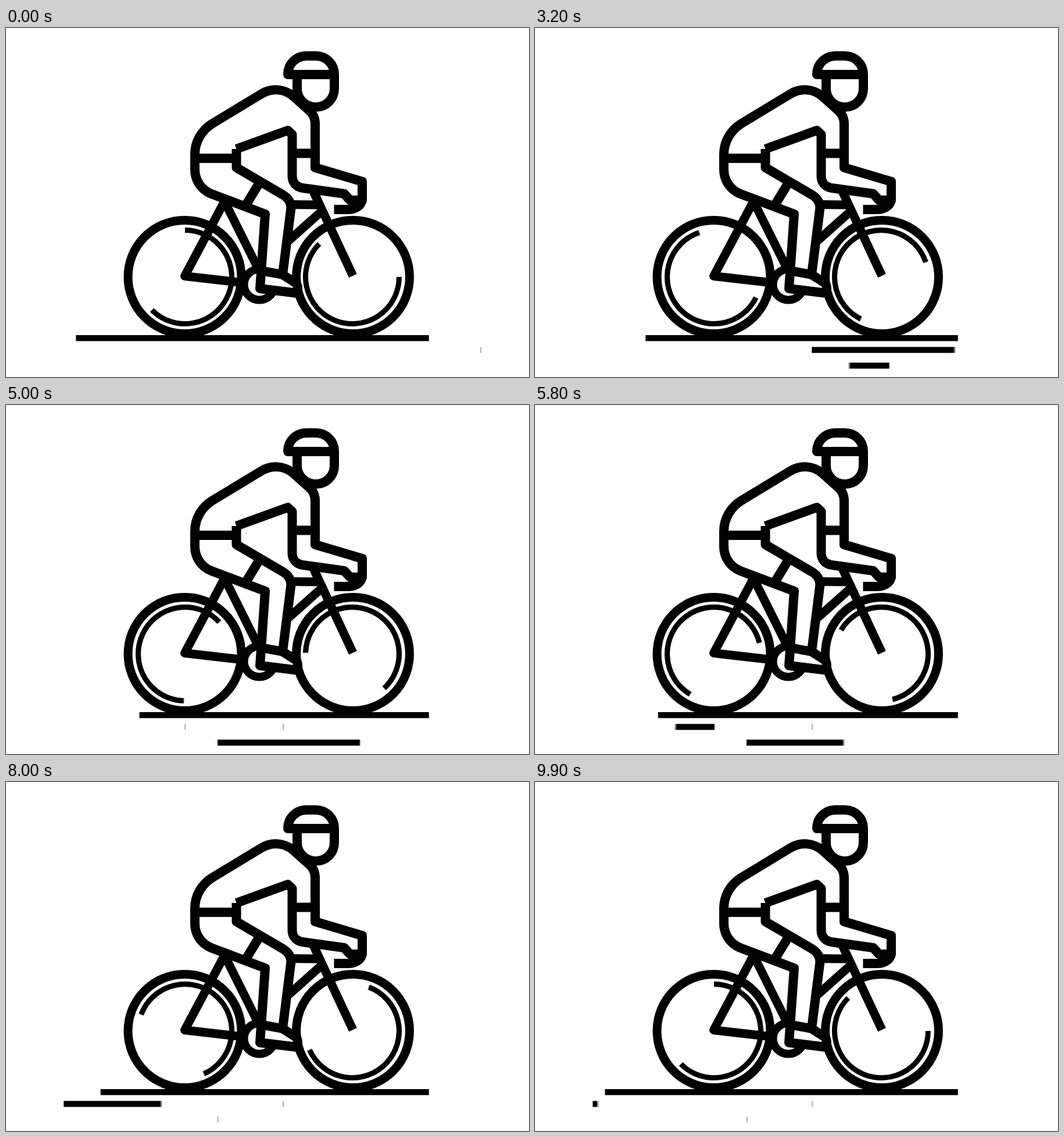
Write an HTML page that moves like this. It is 900 px wide and 600 px high and loops after 10 s.

```html
<!DOCTYPE html>
<html lang="en">
<head>
<meta charset="utf-8">
<title>Cyclist</title>
<style>
  html, body { margin: 0; width: 100%; height: 100%; overflow: hidden; background: #fff; }
  svg { display: block; width: 900px; height: 600px; }
  .ink { fill: none; stroke: #000; stroke-width: 16; stroke-linejoin: round; }
  .bike { stroke-width: 15; }
  .glint { stroke-width: 9; }
</style>
</head>
<body>
<svg viewBox="0 0 900 600">
  <defs id="defs"></defs>
  <rect width="900" height="600" fill="#fff"/>

  <g class="ink bike">
    <circle cx="307.5" cy="428" r="97.5"/>
    <circle cx="597" cy="428" r="97.5"/>
    <g id="glints" class="glint"></g>
    <path d="M376 298L307.5 426.500L408 438"/>
    <path d="M378 302L434 414"/>
    <path d="M488 303.500L538 304M541 317L486 366M529 281L597 426"/>
    <circle cx="436" cy="441" r="26.500" stroke-width="14"/>
  </g>

  <g class="ink">
    <!-- leg and shoe -->
    <path fill="#fff" d="M396.500 208V240L476 286.500C486 292 492 302 490 313L476 424L498 438Q502 441 502 448V456L437 448L446 320L353 285C336 278 325 262 325 243"/>
    <path d="M438 417L476 424M435 268L413 304"/>
    <!-- torso and arms -->
    <path d="M325 244V217C325 195 337 176 354 165L440 113C457 103 478 104 494 117L522 142C529 148 532 156 532 165V240L613 264V296H592L582 285L510 275C499 273 492.500 265 492.500 255V183L485 176L396.500 208"/>
    <path d="M325 224H396M492 215.500H532"/>
    <path d="M564.500 312H590C602 312 611 305 613 296"/>
    <!-- head -->
    <path d="M501 80V104C501 122 515 136 533 136S565 122 565 104V80C565 62 551 48 533 48H517C499 48 485 62 485 80H565"/>
  </g>

  <rect id="ground" y="528" height="10.3"/>
  <g id="streaks"></g>
</svg>
<script>
const NS = 'http://www.w3.org/2000/svg';
const STEP = 100, LOOP = 10000, LAST = 99, PHASE = 2500, SOFT = 2.5;
const byId = id => document.getElementById(id);

function set(el, attrs) {
  for (const key in attrs) el.setAttribute(key, attrs[key]);
  return el;
}
function add(parent, tag, attrs) {
  return parent.appendChild(set(document.createElementNS(NS, tag), attrs));
}

// Clockwise arc, angles measured from the top
function arc(cx, cy, r, from, to) {
  const point = deg => {
    const a = deg * Math.PI / 180;
    return `${cx + r * Math.sin(a)} ${cy - r * Math.cos(a)}`;
  };
  return `M${point(from)}A${r} ${r} 0 1 1 ${point(to)}`;
}

const glints = [{ cx: 308, start: 0 }, { cx: 596, start: 90 }].map(({ cx, start }) => {
  const shape = extra => arc(cx, 428, 80.5, start - extra, start + 225 + extra);
  const group = add(byId('glints'), 'g', {});
  const blur = add(group, 'path', { d: shape(0.9), opacity: 0.4 });
  add(group, 'path', { d: shape(0) });
  return { cx, group, blur };
});

// Each streak is wiped in from the right, then wiped out the same way
const streaks = [
  { left: 476.3, right: 817.7, y: 548.3, start: 0 },
  { left: 364, right: 609.7, y: 575.3, start: 2500 },
  { left: 99.3, right: 309, y: 548.3, start: 5000 }
].map((s, i) => {
  const gradient = add(byId('defs'), 'linearGradient', {
    id: 'wipe' + i, gradientUnits: 'userSpaceOnUse', y1: 0, y2: 0
  });
  add(gradient, 'stop', { offset: 0, 'stop-opacity': 0 });
  add(gradient, 'stop', { offset: 1, 'stop-opacity': 1 });
  const rect = add(byId('streaks'), 'rect', {
    x: s.left, y: s.y, width: s.right - s.left, height: 10.3, fill: `url(#wipe${i})`
  });
  return { ...s, gradient, rect };
});

function render(ms) {
  const step = Math.floor((ms % LOOP) / STEP), t = step * STEP;

  for (const { cx, group, blur } of glints) {
    set(group, { transform: `rotate(${360 * step / LAST} ${cx} 428)` });
    set(blur, { visibility: step % LAST ? 'visible' : 'hidden' });
  }

  const shrink = step <= 50 ? step / 50 : (LAST - step) / (LAST - 50);
  const left = 120.4 + 109.2 * shrink;
  set(byId('ground'), { x: left, width: 727.8 - left });

  for (const s of streaks) {
    const age = t - s.start, leaving = age >= PHASE;
    const progress = Math.min(1, (leaving ? age - PHASE : age) / PHASE);
    const edge = s.right - (s.right - s.left) * progress;
    const soft = leaving ? -SOFT : SOFT;
    set(s.rect, { visibility: age < 0 ? 'hidden' : 'visible' });
    set(s.gradient, { x1: edge - soft, x2: edge + soft });
  }
}

const began = performance.now();
function tick() {
  render(performance.now() - began);
  requestAnimationFrame(tick);
}
tick();
</script>
</body>
</html>
```
